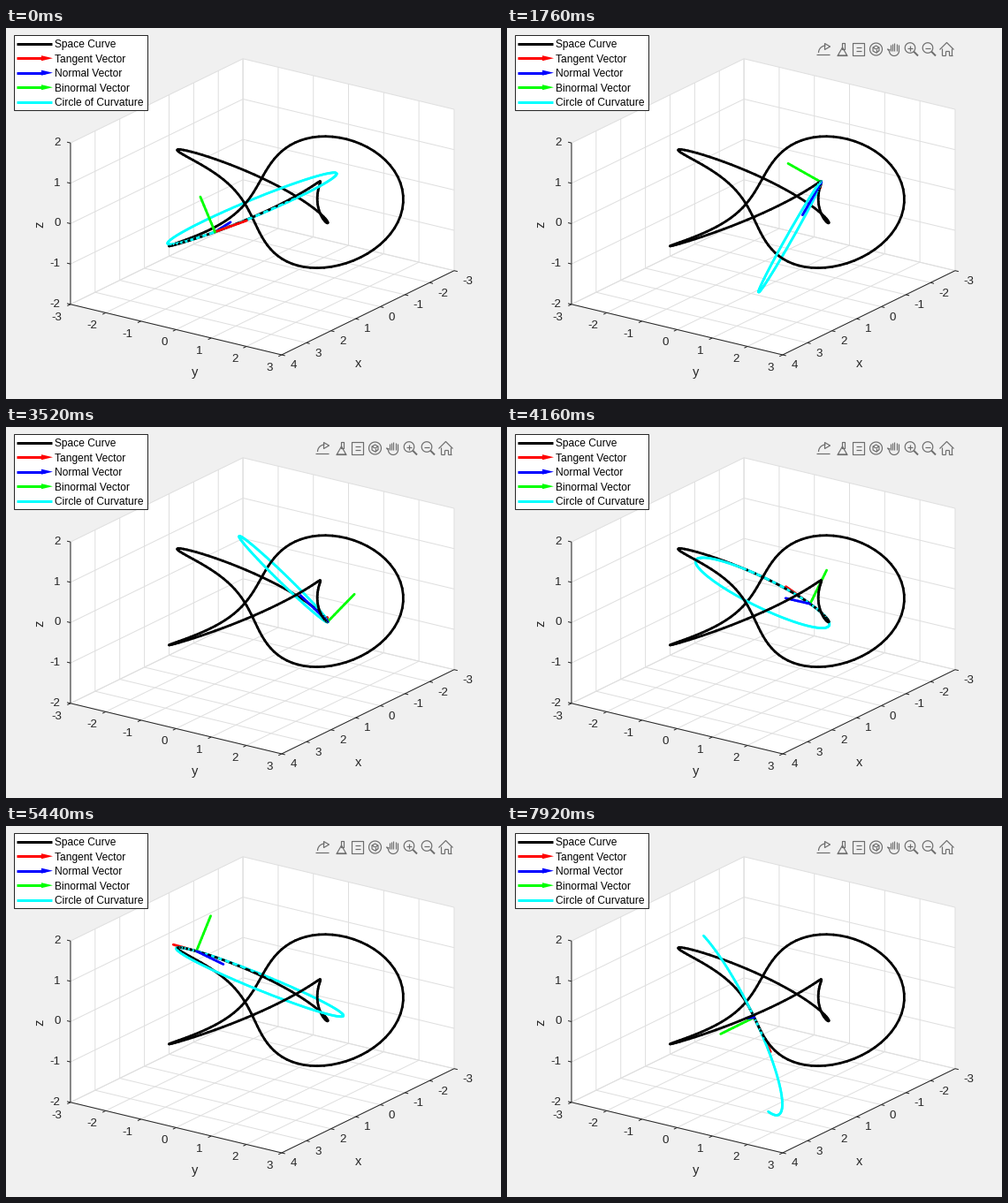
Animation, 560 px wide and 420 px high, one loop 8 s. Source, as a matplotlib script:

```python
import numpy as np
import matplotlib.pyplot as plt
from matplotlib.animation import FuncAnimation
from matplotlib.collections import LineCollection
from matplotlib.patches import Polygon, Rectangle

W, H, DPI = 560, 420, 100
PX = 72 / DPI
FRAMES, INTERVAL = 100, 80
DARK, ICON = "#262626", "#6e6e6e"
LOW, HIGH = np.array([-3, -3, -2]), np.array([4, 3, 2])
STEP = 4 * np.pi / 199

# Orthographic camera, 48.6 px per unit
SCALE, CENTRE = 48.6, np.array([303.9, 195.6])
SIDE, TILT = np.radians(55), np.radians(20)
S, C = np.sin(SIDE), np.cos(SIDE)
SCREEN = SCALE * np.array([[-C, S, 0],
                           [S * np.sin(TILT), C * np.sin(TILT), -np.cos(TILT)]])
TO_VIEWER = np.array([S * np.cos(TILT), C * np.cos(TILT), np.sin(TILT)])

plt.rcParams["font.family"] = "Liberation Sans"
fig = plt.figure(figsize=(W / DPI, H / DPI), dpi=DPI, facecolor="#f0f0f0")
ax = fig.add_axes([0, 0, 1, 1])
ax.set_xlim(0, W)
ax.set_ylim(H, 0)
ax.axis("off")


def project(points):
    return CENTRE + np.asarray(points, float) @ SCREEN.T


def stroke(points, color, width=1.0, z=1):
    x, y = np.transpose(points)
    return ax.plot(x, y, color=color, lw=width * PX, zorder=z,
                   solid_capstyle="butt")[0]


def label(x, y, text, size=13.33, color=DARK, **kw):
    kw = {"ha": "center", "va": "center", **kw}
    ax.text(x, y, text, fontsize=size * PX, color=color, **kw)


def draw_axes():
    (x0, y0, z0), (x1, y1, z1) = LOW, HIGH
    corner = np.array([x0, y0, z0])
    for flat in range(3):
        edges = np.delete(np.diag(HIGH - LOW), flat, axis=0)
        wall = corner + np.array([0 * edges[0], edges[0], edges.sum(0), edges[1]])
        ax.add_patch(Polygon(project(wall), fc="white", ec="none", zorder=0))

    def grid(*points):
        stroke(project(points), "#dfdfdf")

    def tick(point, axis, sign):
        start = project(point)
        direction = sign * SCREEN[:, axis]
        stroke([start, start + 4 * direction / np.hypot(*direction)], DARK, z=2)
        return start

    for x in range(x0, x1 + 1):
        grid((x, y1, z0), (x, y0, z0), (x, y0, z1))
        px, py = tick((x, y1, z0), 1, 1)
        label(px + 9.5, py + 12.3, str(x), ha="left")
    for y in range(y0, y1 + 1):
        grid((x1, y, z0), (x0, y, z0), (x0, y, z1))
        px, py = tick((x1, y, z0), 0, 1)
        label(px - 9.5, py + 14.7, str(y), ha="right")
    for z in range(z0, z1 + 1):
        grid((x1, y0, z), (x0, y0, z), (x0, y1, z))
        px, py = tick((x1, y0, z), 1, -1)
        label(px - 11.5, py, str(z), ha="right")

    stroke(project([(x1, y0, z1), (x1, y0, z0), (x1, y1, z0), (x0, y1, z0)]),
           DARK, z=2)
    label(398.5, 380, "x", 14.67)
    label(213.5, 390, "y", 14.67)
    label(38, 222, "z", 14.67, rotation=90)


def draw_legend():
    ax.add_patch(Rectangle((8.5, 7.5), 151, 85, fc="white", ec=DARK,
                           lw=PX, zorder=6))
    entries = {"Space Curve": "black", "Tangent Vector": "red",
               "Normal Vector": "blue", "Binormal Vector": "lime",
               "Circle of Curvature": "cyan"}
    for i, (text, color) in enumerate(entries.items()):
        y = 17.7 + 16.5 * i
        arrow = "Vector" in text
        stroke([(12, y), (44 if arrow else 52, y)], color, 3, 7)
        if arrow:
            ax.add_patch(Polygon([(40, y - 3), (53, y), (40, y + 3)],
                                 fc=color, ec="none", zorder=7))
        label(55, y + 4.4, text, 12, "black", ha="left", va="baseline",
              zorder=7)


def draw_toolbar():
    """Eight outline icons spaced evenly along one row."""
    parts = []
    cy = 24
    export, brush, tip, rotate, pan, zoom_in, zoom_out, home = \
        357.5 + 20 * np.arange(8)

    def line(*points, width=1.2):
        parts.append(stroke(points, ICON, width, 8))

    def arc(x, y, r, start=0, end=360, n=24):
        a = np.radians(np.linspace(start, end, n + 1))
        line(*zip(x + r * np.cos(a), y + r * np.sin(a)))

    def box(x, y, w, h):
        line((x - w, y - h), (x + w, y - h), (x + w, y + h), (x - w, y + h),
             (x - w, y - h))

    line((export - 8, cy + 6), (export + 7, cy + 6))
    arc(export + 3, cy + 4, 8, 180, 270)
    arc(export + 4, cy - 3, 4, 0, 360, 3)

    box(brush + 3, cy - 4, 1.5, 3.5)
    arc(brush + 2, cy + 4, 6, 30, 390, 3)
    line((brush - 5, cy + 7), (brush + 7, cy + 7))

    box(tip, cy, 6.5, 7)
    for y in (cy - 2, cy + 2):
        line((tip - 3, y), (tip + 3, y))

    arc(rotate, cy, 7)
    arc(rotate, cy, 4, 30, 390, 6)
    for a in np.radians((90, 210, 330)):
        line((rotate, cy), (rotate + 4 * np.cos(a), cy + 4 * np.sin(a)))

    arc(pan + 0.5, cy + 2, 5.5, 0, 180)
    line((pan - 5, cy + 2), (pan - 7, cy), (pan - 4, cy + 1))
    for i in range(5):
        line((pan - 4 + 2.4 * i, cy + 2), (pan - 4 + 2.4 * i, cy - 7 + abs(i - 2)))

    for x in (zoom_in, zoom_out):
        arc(x - 1.5, cy - 1.5, 5.8)
        line((x + 2.7, cy + 2.7), (x + 7.5, cy + 7.5), width=2)
        line((x - 4.5, cy - 1.5), (x + 1.5, cy - 1.5))
    line((zoom_in - 1.5, cy - 4.5), (zoom_in - 1.5, cy + 1.5))

    line((home - 8, cy + 0.5), (home, cy - 7.5), (home + 8, cy + 0.5))
    for w, top in ((5.5, cy - 1), (2, cy + 2)):
        line((home - w, cy + 7), (home - w, top))
        line((home + w, cy + 7), (home + w, top))
    for side in (-1, 1):
        line((home + 2 * side, cy + 7), (home + 6 * side, cy + 7))
    line((home - 2, cy + 2), (home + 2, cy + 2))
    return parts


def knot(t):
    r = 2 + np.cos(1.5 * t)
    return np.stack([r * np.cos(t), r * np.sin(t), np.sin(1.5 * t)], -1)


def frenet(t):
    """Position, unit frame and radius of curvature of the knot at t."""
    cos, sin = np.cos(1.5 * t), np.sin(1.5 * t)
    r, dr, ddr = 2 + cos, -1.5 * sin, -2.25 * cos
    radial = np.array([np.cos(t), np.sin(t), 0])
    around = np.array([-np.sin(t), np.cos(t), 0])
    up = np.array([0, 0, 1])
    velocity = dr * radial + r * around + 1.5 * cos * up
    accel = (ddr - r) * radial + 2 * dr * around - 2.25 * sin * up
    speed = np.linalg.norm(velocity)
    tangent = velocity / speed
    bend = accel - (accel @ tangent) * tangent
    size = np.linalg.norm(bend)
    normal = bend / size
    return (knot(t), tangent, normal, np.cross(tangent, normal),
            speed ** 2 / size)


def pieces(points, n):
    """Cut every chord of a polyline into n short segments."""
    s = np.linspace(0, 1, n + 1)[:, None, None]
    p = points[:-1] + s * np.diff(points, axis=0)
    return np.stack([p[:-1], p[1:]], axis=2).reshape(-1, 2, 3)


CURVE = pieces(knot(np.linspace(0, 4 * np.pi, 200)), 1)
TURN = np.linspace(0, 2 * np.pi, 100)[:, None]
COLORS = np.array([(0, 0, 0), (0, 1, 1), (1, 0, 0), (0, 0, 1), (0, 1, 0)])

draw_axes()
draw_legend()
toolbar = draw_toolbar()
lines = LineCollection([], linewidths=2.8 * PX, capstyle="round", zorder=4)
ax.add_collection(lines, autolim=False)


def update(frame):
    pos, tangent, normal, binormal, radius = frenet((frame + 2) * STEP)
    circle = pos + radius * (normal * (1 - np.cos(TURN))
                             + tangent * np.sin(TURN))
    parts = [CURVE, pieces(circle, 2)]
    parts += [pieces(np.array([pos, pos + 0.89 * v]), 8)
              for v in (tangent, normal, binormal)]
    segments = np.concatenate(parts)
    colors = np.repeat(COLORS, [len(p) for p in parts], axis=0)

    middle = segments.mean(axis=1)
    inside = np.all((middle >= LOW) & (middle <= HIGH), axis=1)
    # Depth key that stays level along the tangent, so touching lines sort well
    toward = TO_VIEWER - (TO_VIEWER @ tangent) * tangent
    order = np.argsort(middle @ toward, kind="stable")
    order = order[inside[order]]

    lines.set_segments(project(segments[order]))
    lines.set_color(colors[order])
    for part in toolbar:
        part.set_visible(frame > 0)
    return [lines, *toolbar]


anim = FuncAnimation(fig, update, frames=FRAMES, interval=INTERVAL,
                     repeat=True, repeat_delay=0, blit=False)
plt.show()
```
